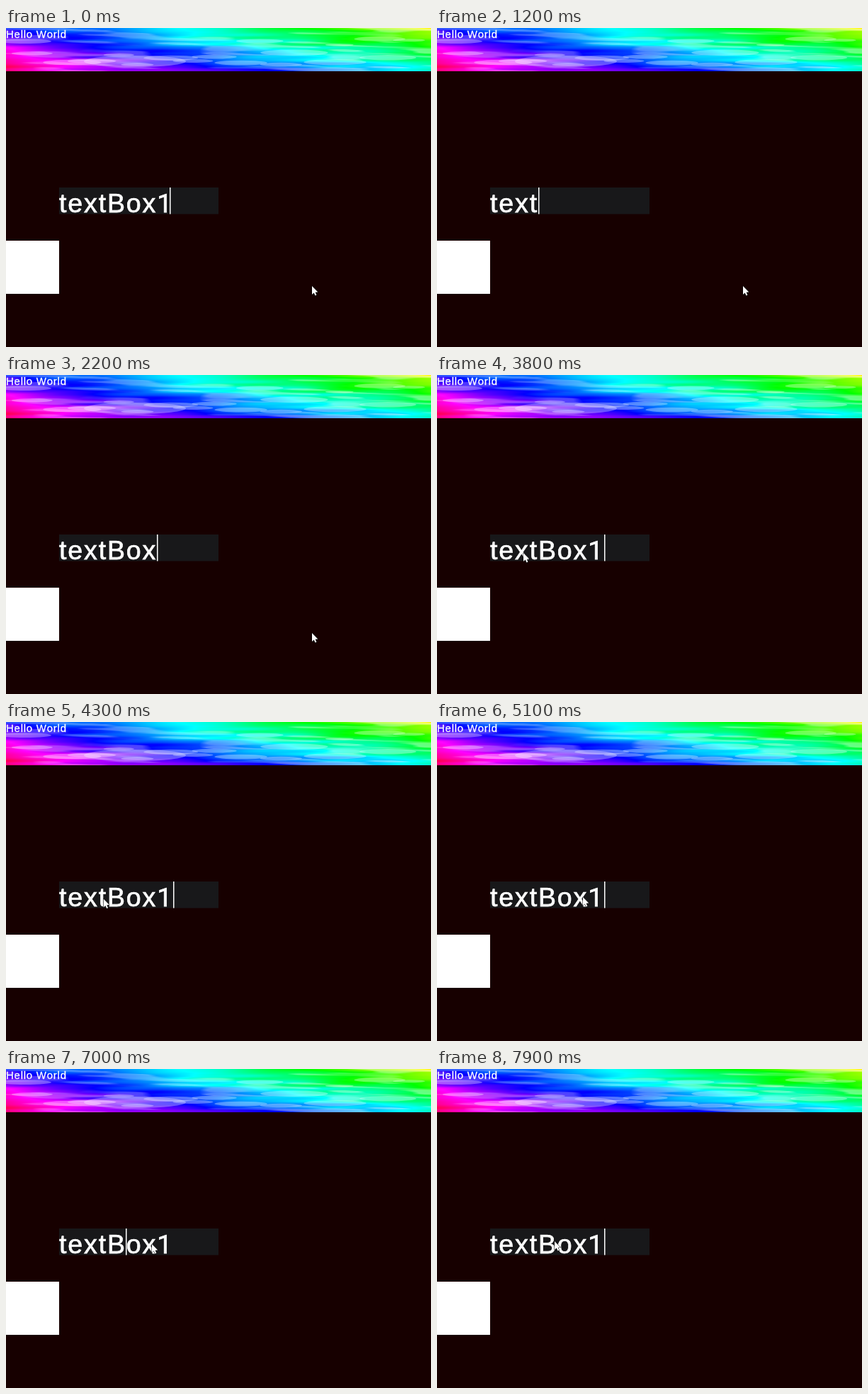
An HTML page with a canvas that plays this animation: 600x450 px, repeating every 8.1 s.

```html
<!DOCTYPE html>
<html>
<head>
<meta charset="utf-8">
<style>
html, body { margin: 0; width: 100%; height: 100%; overflow: hidden; background: #170000; }
canvas { display: block; }
</style>
</head>
<body>
<canvas id="stage" width="600" height="450"></canvas>
<script>
const ctx = document.getElementById('stage').getContext('2d');
const LOOP = 8100, STEP = 100, WIDTH = 600, BAND = 61;
const FULL = 'textBox1';
const DELETED = 1200; // until then the caret hugs the last letter

// Key presses at an even pace; each one changes the text length and the caret.
const runs = [
  { start: 300, gap: 267, count: 4, grow: -1, move: -1 },
  { start: 1800, gap: 220, count: 4, grow: 1, move: 1 },
  { start: 5500, gap: 160, count: 6, grow: 0, move: -1 },
  { start: 6500, gap: 100, count: 2, grow: 0, move: 1 },
  { start: 7000, gap: 100, count: 4, grow: 0, move: 1 }
];

// Pointer moves: [from, until, x, y]
const home = [432, 364];
const moves = [
  [3100, 3600, 45, 238], [3600, 3800, 122, 251], [3800, 4600, 162, 247],
  [4800, 5100, 206, 247], [7100, 7300, 186, 246], [7500, 7900, 166, 243]
];

const clamp = (v, lo, hi) => Math.max(lo, Math.min(hi, v));
const mix = (a, b, k) => a + (b - a) * k;
const smooth = k => k * k * (3 - 2 * k);

function hash(x, y) {
  const v = Math.sin(x * 127.1 + y * 311.7) * 43758.5453;
  return v - Math.floor(v);
}

function noise(x, y) {
  const ix = Math.floor(x), iy = Math.floor(y);
  const u = smooth(x - ix), v = smooth(y - iy);
  return mix(
    mix(hash(ix, iy), hash(ix + 1, iy), u),
    mix(hash(ix, iy + 1), hash(ix + 1, iy + 1), u), v);
}

// One channel of a fully saturated hue; n is 5, 3 or 1 for r, g, b.
function channel(hue, n) {
  const k = (n + hue / 60) % 6;
  return 1 - clamp(Math.min(k, 4 - k), 0, 1);
}

function hueAt(x, y) {
  const s = x / WIDTH;
  const top = 245 - 180 * s;
  const bottom = 262 - 80 * s * s + 85 * (1 - s) ** 4;
  const wave = noise(x / 75 + y / 30, y / 4.5) - 0.5;
  return mix(top, bottom, y / BAND) + wave * 30;
}

function paintBand() {
  const layer = document.createElement('canvas');
  layer.width = WIDTH;
  layer.height = BAND;
  const c = layer.getContext('2d');
  const img = c.createImageData(WIDTH, BAND);
  for (let y = 0, i = 0; y < BAND; y++) {
    for (let x = 0; x < WIDTH; x++, i += 4) {
      const hue = hueAt(x, y);
      const streak = noise(x / 60 + 40, y / 3.2 + 9 - x / 130);
      const pale = clamp((streak - 0.58) * 5, 0, 1) * mix(0.2, 0.4, x / WIDTH);
      [5, 3, 1].forEach((n, j) => {
        img.data[i + j] = 255 * mix(channel(hue, n), 1, pale);
      });
      img.data[i + 3] = 255;
    }
  }
  c.putImageData(img, 0, 0);

  const ripple = (x, y, rx, ry) => {
    c.beginPath();
    c.ellipse(x, y, rx, ry, 0, 0, Math.PI * 2);
    c.fill();
  };
  c.fillStyle = 'rgba(255,255,255,0.33)';
  ripple(182, 47, 72, 8);
  for (let i = 0; i < 18; i++) {
    const rx = mix(20, 48, hash(i, 3));
    ripple(WIDTH * (i + hash(i, 1)) / 18, mix(15, 58, hash(i, 2)), rx, rx / 11);
  }
  return layer;
}

// Digits take the face whose 1 has no foot.
function setType(size, ch) {
  const face = /\d/.test(ch) ? 'Roboto' : '"Liberation Sans"';
  ctx.font = size + 'px ' + face + ', Arial, sans-serif';
  ctx.letterSpacing = size * 0.05 + 'px';
}

function drawText(text, size, x, y) {
  ctx.fillStyle = ctx.strokeStyle = '#fff';
  ctx.lineWidth = size * 0.02;
  for (const ch of text) {
    setType(size, ch);
    ctx.fillText(ch, x, y);
    ctx.strokeText(ch, x, y);
    x += ctx.measureText(ch).width;
  }
}

function textWidth(text, size) {
  let w = 0;
  for (const ch of text) {
    setType(size, ch);
    w += ctx.measureText(ch).width;
  }
  return w;
}

function typingAt(t) {
  let shown = FULL.length, caret = shown;
  for (const r of runs) {
    const n = clamp(Math.floor((t + STEP / 2 - r.start) / r.gap) + 1, 0, r.count);
    shown += n * r.grow;
    caret += n * r.move;
  }
  return [shown, caret];
}

function pointerAt(t) {
  let [x, y] = home;
  for (const [from, until, toX, toY] of moves) {
    const k = clamp((t - from) / (until - from), 0, 1) ** 2;
    x = mix(x, toX, k);
    y = mix(y, toY, k);
  }
  return [x, y];
}

function drawPointer(x, y) {
  const shape = [[0, 0], [0, 12], [2.7, 9.6], [4.5, 13.6], [6.4, 12.8], [4.7, 8.8], [8.3, 8.6]];
  ctx.beginPath();
  shape.forEach(([dx, dy]) => ctx.lineTo(x + dx, y + dy));
  ctx.closePath();
  ctx.lineWidth = 1;
  ctx.strokeStyle = '#000';
  ctx.stroke();
  ctx.fillStyle = '#fff';
  ctx.fill();
}

const band = paintBand();

function draw(t) {
  ctx.fillStyle = '#170000';
  ctx.fillRect(0, 0, WIDTH, 450);
  ctx.drawImage(band, 0, 0);
  drawText('Hello World', 15, 0, 14);

  ctx.fillStyle = '#18181a';
  ctx.fillRect(75, 225, 225, 37.5);
  const [shown, caret] = typingAt(t);
  drawText(FULL.slice(0, shown), 37.5, 75, 259.5);
  const lag = t < DELETED ? 4.4 : 0;
  const x = 75 + textWidth(FULL.slice(0, caret), 37.5) - lag;
  ctx.fillRect(Math.floor(x + 0.1), 225, 1.5, 37.5);
}

function drawScene(t) {
  draw(t);
  ctx.fillStyle = '#fff';
  ctx.fillRect(0, 300, 75, 75);
  drawPointer(...pointerAt(t));
}

function frame() {
  const t = performance.now() % LOOP;
  drawScene(Math.floor(t / STEP) * STEP);
  requestAnimationFrame(frame);
}
frame();
</script>
</body>
</html>
```
